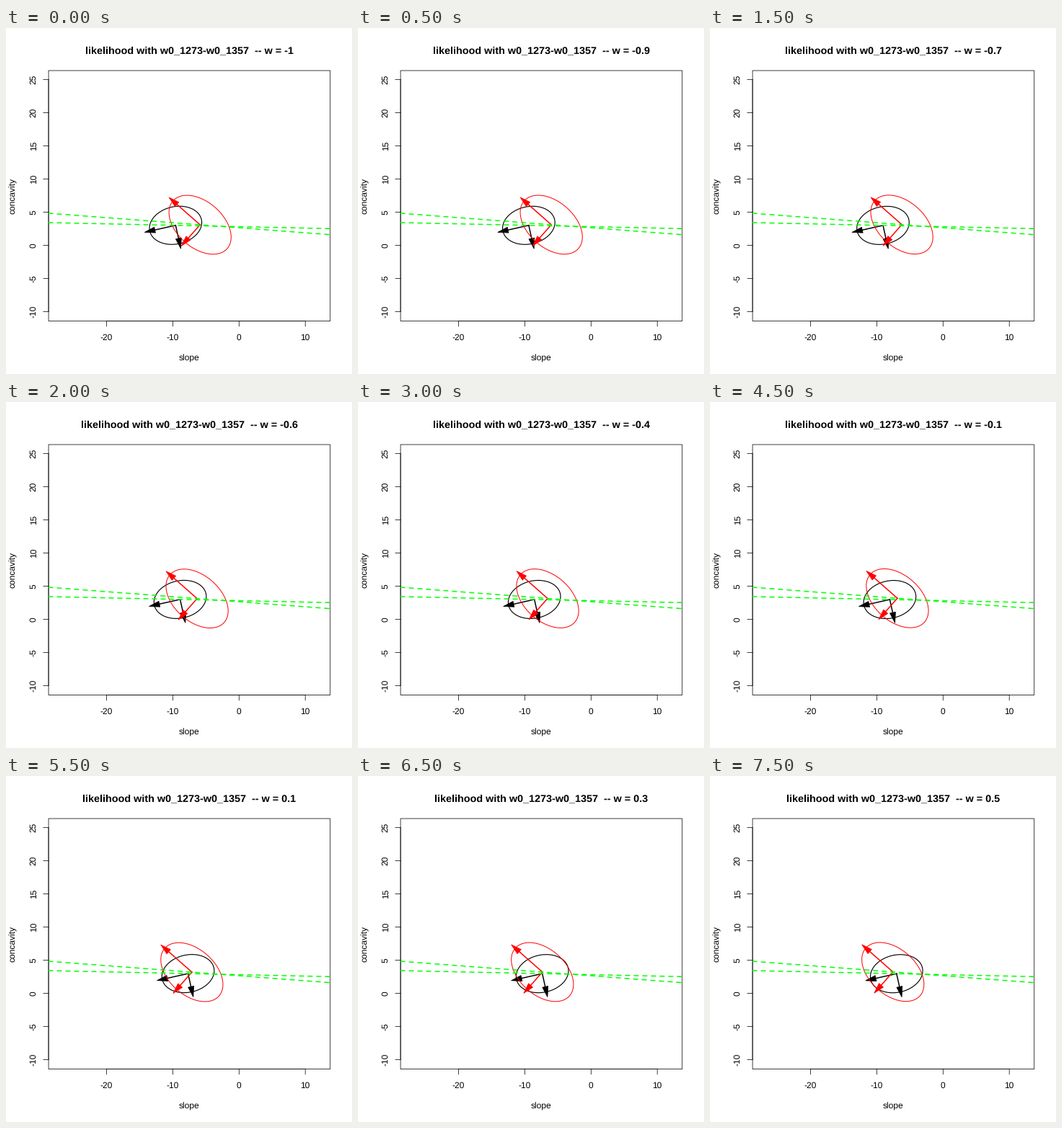
Write a matplotlib script that moves like this. It is 480 by 480 pixels and loops after 8000 ms.

```python
import numpy as np
import matplotlib.pyplot as plt
from matplotlib.animation import FuncAnimation
from matplotlib.patches import Polygon, Rectangle

SIZE, DPI = 480, 72          # at 72 dpi one point is one pixel
LEFT, RIGHT, TOP, BOTTOM = 59.04, 449.76, 59.04, 406.56
MID_X, MID_Y = (LEFT + RIGHT) / 2, (TOP + BOTTOM) / 2
LINE = 14.4                  # height of one margin line
THIN, THICK = 0.75, 1.5
STEPS = 16
LIME = "#00ff00"

plt.rcParams["font.family"] = "Liberation Sans"
plt.rcParams["text.hinting"] = "no_hinting"
fig = plt.figure(figsize=(SIZE / DPI, SIZE / DPI), dpi=DPI, facecolor="white")
ax = fig.add_axes([0, 0, 1, 1])
ax.set_xlim(0, SIZE)
ax.set_ylim(SIZE, 0)
ax.axis("off")


def px(v):
    return 323.3 + 9.19 * v


def py(v):
    return 301.5 - 9.2 * v


def label(x, y, text, size=12, **kw):
    return ax.text(x, y, text, fontsize=size, ha="center", va="baseline",
                   rotation_mode="anchor", **kw)


def rule(xs, ys):
    ax.plot(xs, ys, color="black", lw=THIN, snap=False)


def draw_frame():
    ax.add_patch(Rectangle((LEFT, TOP), RIGHT - LEFT, BOTTOM - TOP, fill=False,
                           ec="black", lw=THIN, snap=False))
    rule([px(-20), px(10)], [BOTTOM] * 2)
    for v in range(-20, 11, 10):
        rule([px(v)] * 2, [BOTTOM, BOTTOM + LINE / 2])
        label(px(v), BOTTOM + 1.8 * LINE, str(v))
    rule([LEFT] * 2, [py(-10), py(25)])
    for v in range(-10, 26, 5):
        rule([LEFT - LINE / 2, LEFT], [py(v)] * 2)
        label(LEFT - 1.2 * LINE, py(v), str(v), rotation=90)
    label(MID_X, BOTTOM + 3.8 * LINE, "slope")
    label(LEFT - 3.2 * LINE, MID_Y, "concavity", rotation=90)


def track(y0, y1):
    """Straight line across the plot box, as a function of x."""
    return lambda x: y0 + (y1 - y0) * (x - LEFT) / (RIGHT - LEFT)


# Arrowhead along +x, centred on 0
HEAD = np.array([(7.3, 0), (-7.3, 4), (-7.3, -4)])
ANGLE = np.linspace(0, 2 * np.pi, 200)


class Contour:
    """Ellipse with an arrow along each half axis, sliding on a line."""

    def __init__(self, color, lw, x0, dx, path, axis, a, b, z):
        self.x0, self.dx, self.path = x0, dx, path
        u = np.array(axis) / np.hypot(*axis)
        v = np.array([u[1], -u[0]])
        if v[1] < 0:
            v = -v
        self.axes = [(u, a), (v, b)]
        self.ring = (np.outer(np.cos(ANGLE), u * a)
                     + np.outer(np.sin(ANGLE), v * b))
        self.curve, = ax.plot([], [], color=color, lw=lw, zorder=z)
        self.arrows = []
        for _ in self.axes:
            shaft, = ax.plot([], [], color=color, lw=THICK, zorder=z + 0.1)
            head = Polygon(HEAD, closed=True, fc=color, ec=color, lw=THIN,
                           joinstyle="round", zorder=z + 0.2)
            ax.add_patch(head)
            self.arrows.append((shaft, head))

    def move(self, step):
        x = self.x0 + self.dx * step
        c = np.array([x, self.path(x)])
        self.curve.set_data(*(c + self.ring).T)
        for (d, r), (shaft, head) in zip(self.axes, self.arrows):
            end = c + d * r
            shaft.set_data([c[0], end[0]], [c[1], end[1]])
            normal = np.array([-d[1], d[0]])
            head.set_xy(end + np.outer(HEAD[:, 0], d)
                        + np.outer(HEAD[:, 1], normal))

    def artists(self):
        return [self.curve] + [part for arrow in self.arrows for part in arrow]


draw_frame()
title = label(MID_X, 35, "", 14.4, weight="bold")

steep = track(257.0, 286.7)
flat = track(270.0, 278.3)
for line in (steep, flat):
    ax.plot([LEFT, RIGHT], [line(LEFT), line(RIGHT)], color=LIME, lw=THICK,
            ls=(0, (4, 4)), dash_capstyle="round", zorder=6)

contours = [
    Contour("black", 1.15, 235.3, 1.567, flat, (-42.5, 9.5), 36.75, 25.9, 3),
    Contour("red", 1.0, 269.2, -1.03, steep, (-43.7, -38.5), 50.1, 31.9, 4),
]


def update(step):
    w = (step - 10) / 10
    title.set_text(f"likelihood with w0_1273-w0_1357  -- w = {w:g}")
    for c in contours:
        c.move(step)
    return [title] + [part for c in contours for part in c.artists()]


anim = FuncAnimation(fig, update, frames=STEPS, interval=500, repeat=True,
                     repeat_delay=0, blit=False)
plt.show()
```
